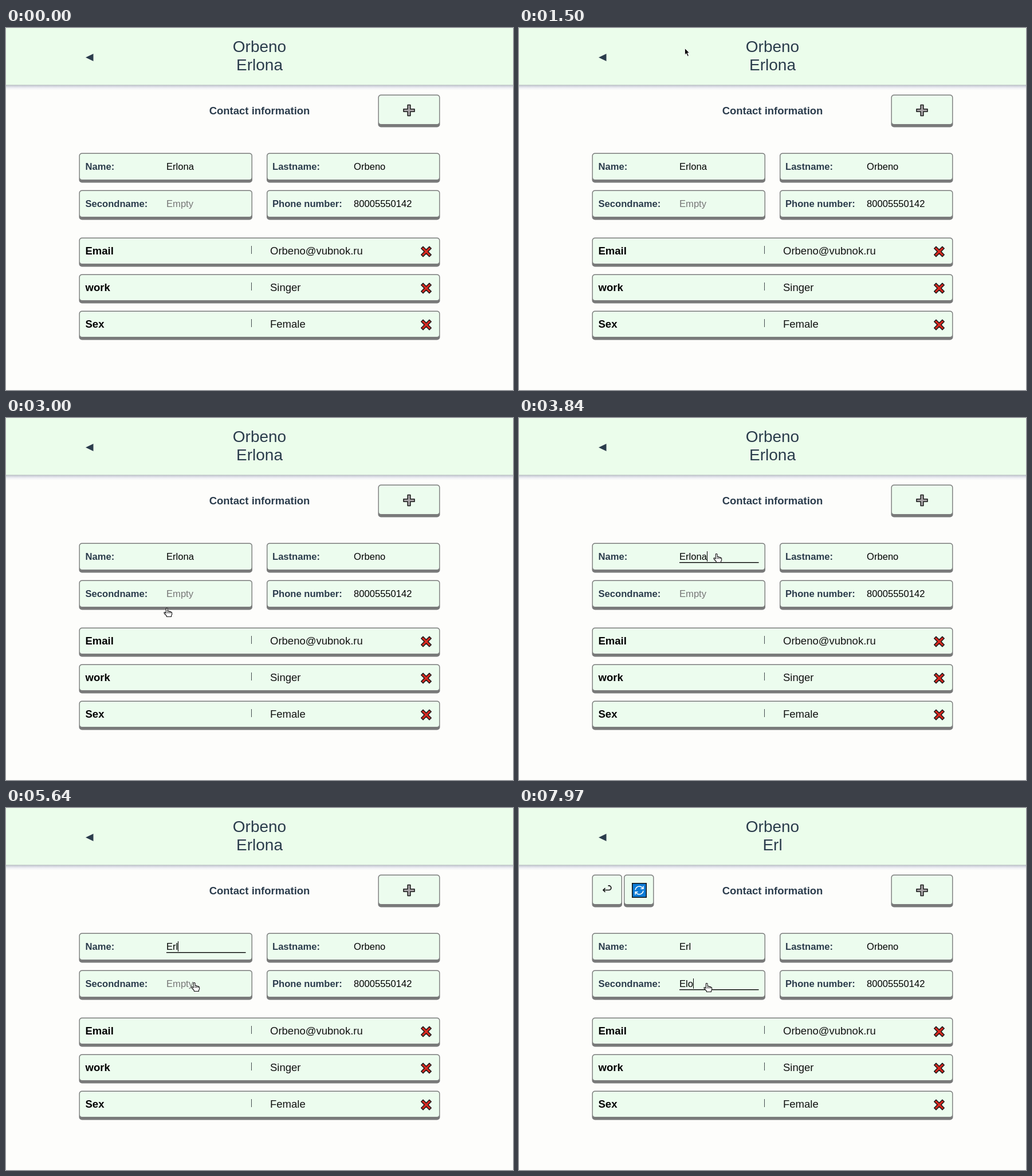
Animation of 885 by 633 pixels, one loop 8000 ms. Source, as an HTML page with a canvas:

```html
<!DOCTYPE html>
<html lang="en">
<head>
<meta charset="utf-8">
<title>Contact card</title>
<style>
html, body { margin: 0; width: 100%; height: 100%; overflow: hidden; background: #fdfdfb; }
canvas { display: block; width: 885px; height: 633px; }
</style>
</head>
<body>
<canvas id="stage" width="885" height="633"></canvas>
<script>
const ctx = document.getElementById('stage').getContext('2d');
const LOOP = 8000;
const FAMILY = '"Liberation Sans", Arial, sans-serif';
const PAGE = '#fdfdfb', CARD = '#ecfcee', INK = '#2b3c4c';
const SMALL = 16.6, LARGE = 18.5;
const FIRST = 'Erlona', LAST = 'Orbeno', SECOND = 'Elo';

const CLICK_FIRST = 3450, CLICK_SECOND = 5900;
const ERASE = [4150, 4320, 4490];
const TYPE = [6900, 7450, 7750];

// Pointer stops: time, x, y
const PATH = [
  [600, 289, -20], [1050, 289, 35], [1660, 289, 35], [2150, 198, 452],
  [2650, 198, 452], [3300, 344, 237], [4900, 344, 237], [5550, 328, 305],
  [5800, 328, 305], [6000, 327, 306]
];

// A centred column 630 wide
const LEFT = 127.5, WIDTH = 630, HALF = 302.5;
const RIGHT = LEFT + WIDTH - HALF;
const FIELDS = [
  [LEFT, 218.5, HALF, 52], [RIGHT, 218.5, HALF, 52],
  [LEFT, 283.5, HALF, 52], [RIGHT, 283.5, HALF, 52]
];
const ROWS = [
  ['Email', LAST + '@vubnok.ru'], ['work', 'Singer'], ['Sex', 'Female']
].map(([key, value], i) => ({ key, value, box: [LEFT, 366.5 + i * 64, WIDTH, 51] }));
const ADD = [649.5, 116.5, 108, 57];
const UNDO = [LEFT, 116.5, 52.5, 57], REFRESH = [183, 116.5, 52.5, 57];

function text(str, x, y, size, { color = '#000', bold = false, align = 'left' } = {}) {
  ctx.font = `${bold ? 'bold ' : ''}${size}px ${FAMILY}`;
  ctx.fillStyle = color;
  ctx.textAlign = align;
  ctx.fillText(str, x, y);
}

function rounded(x, y, w, h, r, fill) {
  ctx.beginPath();
  ctx.roundRect(x, y, w, h, r);
  ctx.fillStyle = fill;
  ctx.fill();
}

function card([x, y, w, h]) {
  rounded(x, y, w, h, 5, '#797a7a');
  rounded(x + 1.4, y + 1.4, w - 2.8, h - 7, 4, CARD);
}

function shape(points, fill, stroke, width) {
  ctx.beginPath();
  points.forEach(([x, y]) => ctx.lineTo(x, y));
  ctx.closePath();
  ctx.fillStyle = fill;
  ctx.fill();
  if (!stroke) return;
  ctx.strokeStyle = stroke;
  ctx.lineWidth = width;
  ctx.lineJoin = 'round';
  ctx.stroke();
}

// Outlined plus; turned by 45 degrees it becomes the delete mark
function cross(x, y, arm, half, angle, fill) {
  ctx.save();
  ctx.translate(x, y);
  ctx.rotate(angle);
  shape([
    [-half, -arm], [half, -arm], [half, -half], [arm, -half], [arm, half], [half, half],
    [half, arm], [-half, arm], [-half, half], [-arm, half], [-arm, -half], [-half, -half]
  ], fill, '#1c1c1c', 1.6);
  ctx.restore();
}

function header(first) {
  const shade = ctx.createLinearGradient(0, 99, 0, 109);
  shade.addColorStop(0, '#a9adb2');
  shade.addColorStop(0.25, '#d0d3dc');
  shade.addColorStop(0.6, '#f0f1f5');
  shade.addColorStop(1, PAGE);
  ctx.fillStyle = shade;
  ctx.fillRect(0, 99, 885, 10);
  ctx.fillStyle = '#ebfdeb';
  ctx.fillRect(0, 0, 885, 99.5);
  text(LAST, 442.5, 42, 28, { color: INK, align: 'center' });
  text(first, 442.5, 74, 28, { color: INK, align: 'center' });
  shape([[139, 51.5], [152.5, 45], [152.5, 58]], INK);
}

function undoIcon() {
  ctx.strokeStyle = '#111';
  ctx.lineWidth = 1.7;
  ctx.beginPath();
  ctx.moveTo(147, 143.5);
  ctx.lineTo(157, 143.5);
  ctx.arc(157, 139.7, 3.8, Math.PI / 2, -Math.PI / 2, true);
  ctx.lineTo(155.5, 135.9);
  ctx.moveTo(150.5, 140);
  ctx.lineTo(147, 143.5);
  ctx.lineTo(150.5, 147);
  ctx.stroke();
}

function refreshIcon() {
  ctx.fillStyle = '#111';
  ctx.fillRect(197, 131, 26, 26);
  ctx.fillStyle = '#0d7bd6';
  ctx.fillRect(198.5, 132.5, 23, 23);
  for (const turn of [0, Math.PI]) {
    ctx.save();
    ctx.translate(210, 144);
    ctx.rotate(turn);
    ctx.strokeStyle = '#fff';
    ctx.lineWidth = 1.6;
    ctx.beginPath();
    ctx.arc(0, 0, 7, Math.PI * 1.03, Math.PI * 1.88);
    ctx.moveTo(7, -7.5);
    ctx.lineTo(7, -2.8);
    ctx.lineTo(2.4, -2.8);
    ctx.stroke();
    ctx.restore();
  }
}

function focus(value, y, sinceKey) {
  ctx.fillStyle = '#000';
  ctx.fillRect(280, y + 4, 138.5, 1.4);
  if (sinceKey % 1000 >= 500) return;
  ctx.font = `${SMALL}px ${FAMILY}`;
  ctx.fillRect(Math.round(280 + ctx.measureText(value).width), y - 15, 1, 18);
}

function pointerAt(t) {
  if (t < PATH[0][0]) return null;
  const i = PATH.findIndex(p => p[0] > t);
  if (i < 0) return PATH[PATH.length - 1].slice(1);
  const [t0, x0, y0] = PATH[i - 1], [t1, x1, y1] = PATH[i];
  const u = (t - t0) / (t1 - t0), k = u * u * (3 - 2 * u);
  return [Math.round(x0 + (x1 - x0) * k), Math.round(y0 + (y1 - y0) * k)];
}

function pointer(pos, targets) {
  if (!pos) return;
  const [px, py] = pos;
  const over = targets.some(([x, y, w, h]) => px >= x && px < x + w && py >= y && py < y + h);
  ctx.save();
  ctx.translate(px + 0.5, py + 0.5);
  if (over) {
    shape([
      [-1, 0], [1, 0], [1.6, 1], [1.6, 5], [4, 5], [4.6, 6], [7, 6], [7.4, 7], [9, 7.4],
      [9.2, 11], [8, 13], [8, 15], [0, 15], [-0.5, 13], [-4, 9.5], [-4.6, 7.6], [-3, 7.2], [-1.4, 9]
    ], '#fff', '#111', 1.1);
    ctx.beginPath();
    for (const x of [1.6, 4.2, 6.8]) {
      ctx.moveTo(x, 6);
      ctx.lineTo(x, 9);
    }
    ctx.stroke();
  } else {
    shape([[0, 0], [0, 11.5], [2.6, 9], [4.8, 14], [6.8, 13.1], [4.6, 8.2], [8, 8.2]],
      '#000', '#fff', 0.8);
  }
  ctx.restore();
}

function draw(t) {
  const erased = ERASE.filter(k => k <= t).length;
  const typed = TYPE.filter(k => k <= t).length;
  const first = FIRST.slice(0, FIRST.length - erased);
  const second = SECOND.slice(0, typed);
  const saved = t >= CLICK_SECOND;
  const lastKey = Math.max(...[CLICK_FIRST, CLICK_SECOND, ...ERASE, ...TYPE].filter(k => k <= t));
  const label = { color: INK, bold: true };

  ctx.fillStyle = PAGE;
  ctx.fillRect(0, 0, 885, 633);
  header(saved ? first : FIRST);
  text('Contact information', 442.5, 151, LARGE, { ...label, align: 'center' });

  const targets = [...FIELDS, ...ROWS.map(r => r.box), ADD];
  if (saved) targets.push(UNDO, REFRESH);
  targets.forEach(card);
  cross(703.5, 144, 9.5, 2.3, 0, '#aaa6a9');
  if (saved) {
    undoIcon();
    refreshIcon();
  }

  text('Name:', 138.5, 248, SMALL, label);
  text(first, 280, 248, SMALL);
  text('Lastname:', 465, 248, SMALL, label);
  text(LAST, 607, 248, SMALL);
  text('Secondname:', 138.5, 313, SMALL, label);
  text(second || 'Empty', 280, 313, SMALL, { color: second ? '#000' : '#757575' });
  text('Phone number:', 465, 313, SMALL, label);
  text('80005550142', 607, 313, SMALL);

  for (const { key, value, box: [, y] } of ROWS) {
    text(key, 138.5, y + 29.5, LARGE, { bold: true });
    text(value, 461, y + 29.5, LARGE, { color: '#111' });
    ctx.fillStyle = '#444b50';
    ctx.fillRect(428, y + 14.5, 1, 14);
    cross(733.5, y + 24.5, 10, 2.3, Math.PI / 4, '#d8281f');
  }

  if (saved) focus(second, 313, t - lastKey);
  else if (t >= CLICK_FIRST) focus(first, 248, t - lastKey);
  pointer(pointerAt(t), targets);
}

function tick() {
  draw(performance.now() % LOOP);
  requestAnimationFrame(tick);
}
tick();
</script>
</body>
</html>
```
